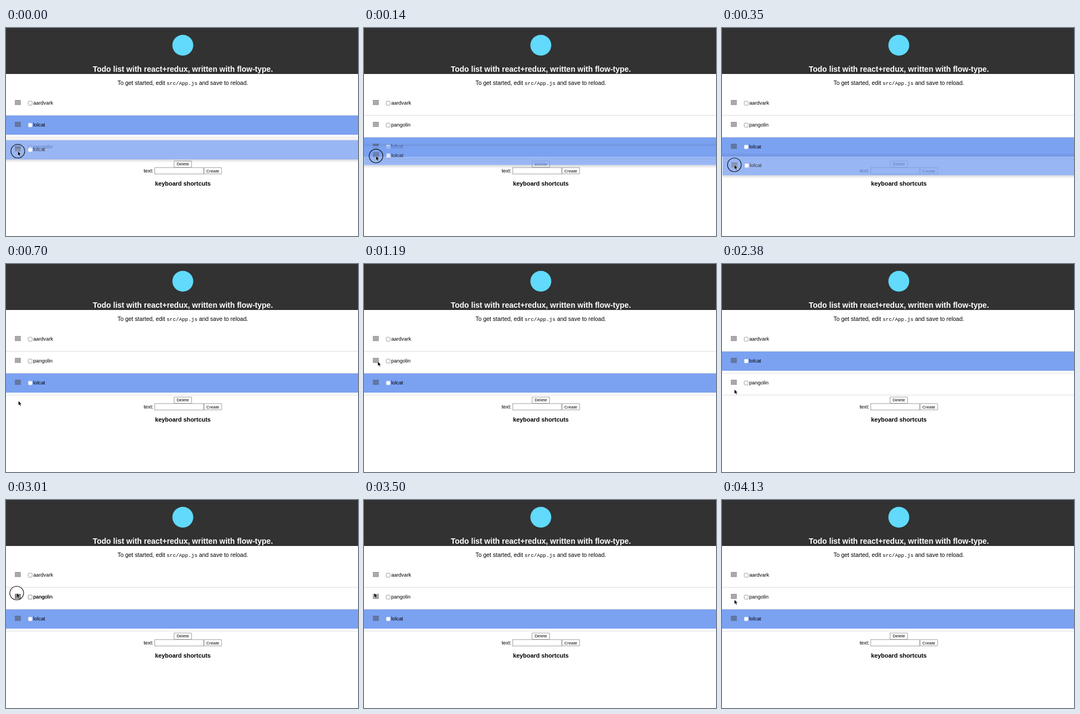
An HTML page that plays this animation: 640 px wide and 380 px high, repeating every 4.2 s.

```html
<!DOCTYPE html>
<html lang="en">
<head>
<meta charset="utf-8">
<title>Todo list</title>
<style>
  html, body { margin: 0; width: 100%; height: 100%; overflow: hidden; background: #fff; }
  svg { display: block; width: 100%; height: 100%; }
  text { font: 9.33px "Liberation Sans", Arial, sans-serif; fill: #000; white-space: pre; }
  .title { font-size: 14px; font-weight: bold; fill: #fff; text-anchor: middle; }
  .intro { font-size: 10.5px; }
  .code { font: 9.33px "Liberation Mono", "Courier New", monospace; }
  .heading { font-size: 10.92px; font-weight: bold; text-anchor: middle; }
  .button { font-size: 7.78px; text-anchor: middle; }
  .box { fill: #fff; stroke: #858585; stroke-width: .8; }
  .rule { stroke: #dedede; }
  .grip { fill: none; stroke: #484848; stroke-width: .9; }
</style>
</head>
<body>
<svg viewBox="0 0 640 380">
  <defs>
    <linearGradient id="below" x2="0" y2="1">
      <stop stop-color="#000" stop-opacity=".2"/>
      <stop offset="1" stop-color="#000" stop-opacity="0"/>
    </linearGradient>
    <linearGradient id="above" x2="0" y2="1">
      <stop stop-color="#000" stop-opacity="0"/>
      <stop offset="1" stop-color="#000" stop-opacity=".11"/>
    </linearGradient>
  </defs>
  <rect width="640" height="380" fill="#fff"/>
  <rect width="640" height="84" fill="#323232"/>
  <circle cx="321.5" cy="31.5" r="19" fill="#61dafb"/>
  <text class="title" x="321.5" y="79.5">Todo list with react+redux, written with flow-type.</text>
  <text class="intro" x="202.7" y="104.3">To get started, edit <tspan class="code">src/App.js</tspan> and save to reload.</text>

  <path class="rule" d="M0 159.5H640M0 199.5H640M0 239.5H640"/>
  <g id="rows"></g>

  <rect class="box" x="305.5" y="243" width="32" height="11.5" rx=".6"/>
  <text class="button" x="321.5" y="251.4">Delete</text>
  <text x="250.2" y="263.8">text:</text>
  <rect class="box" x="270.5" y="255" width="89" height="11.8"/>
  <rect class="box" x="360" y="255" width="32" height="11.5" rx=".6"/>
  <text class="button" x="376" y="263.5">Create</text>
  <text class="heading" x="321.5" y="287.8">keyboard shortcuts</text>

  <g id="ghosts" opacity=".77"></g>
  <g id="pointer">
    <circle id="ring" r="12.5" fill="none" stroke="#111" stroke-width="1.2"/>
    <path d="M0 0V8.2L1.9 6.5L3.2 9.4L4.7 8.7L3.4 5.9H5.9Z" fill="#000" stroke="#fff" stroke-width=".5"/>
  </g>
</svg>
<script>
const LOOP = 4200, STEP = 70, BLUE = "#7ba1f1";
const $ = id => document.getElementById(id);

// time, x, y of the pointer
const path = [
  [0, 21.5, 225], [350, 22.5, 250], [700, 22.5, 250],
  [1120, 25, 178], [1330, 25, 178], [1750, 24.5, 238],
  [1960, 23.5, 242], [2240, 23, 240], [2380, 22.5, 229],
  [2590, 22, 210], [2730, 21.5, 207], [3010, 19.5, 170],
  [3220, 18.5, 169], [3500, 18.5, 170], [3780, 22, 207],
  [3920, 22.5, 207], [4130, 22.5, 182], [LOOP, 22, 182]
];

const drags = [
  { name: "lolcat", from: 0, to: 630, offset: t => -3 + 4 * Math.min(1, t / 350), left: 21.5 },
  { name: "pangolin", from: 1330, to: 2310, offset: () => -1 },
  { name: "pangolin", from: 2590, to: 3500, offset: () => 7 }
];

// lolcat sits above pangolin during these spans
const lolcatFirst = t => t < 70 || (t >= 1610 && t < 2940);

function rowMarkup(name, shadow) {
  const blue = name === "lolcat";
  const back = blue ? `<rect y="-17" width="640" height="35" fill="${BLUE}"/>` : "";
  const shade = blue && shadow
    ? `<rect y="-23" width="640" height="6" fill="url(#above)"/>
       <rect y="18" width="640" height="6" fill="url(#below)"/>` : "";
  const bars = [0, 1, 2, 3, 4].map(i => `M16 ${-4.7 + i * 1.9}h11`).join("");
  return `${shade}${back}<path class="grip" d="${bars}"/>
    <rect class="box" x="40.4" y="-3.2" width="7.2" height="7.2" rx="1.4"
      ${blue ? 'style="stroke:#b9c4dd"' : ""}/>
    <text x="49.4" y="3.2">${name}</text>`;
}

function addRow(parent, name, shadow) {
  const row = document.createElementNS("http://www.w3.org/2000/svg", "g");
  row.innerHTML = rowMarkup(name, shadow);
  parent.append(row);
  return row;
}

const place = (node, x, y) => node.setAttribute("transform", `translate(${x} ${y})`);
const show = (node, on) => node.setAttribute("visibility", on ? "visible" : "hidden");

const rows = {}, ghosts = {};
for (const name of ["aardvark", "lolcat", "pangolin"]) rows[name] = addRow($("rows"), name);
for (const name of ["lolcat", "pangolin"]) ghosts[name] = addRow($("ghosts"), name, true);
place(rows.aardvark, 0, 137);

function pointerAt(t) {
  const i = path.findIndex(p => p[0] > t);
  const [t0, x0, y0] = path[i - 1], [t1, x1, y1] = path[i];
  const u = (t - t0) / (t1 - t0), e = u * u * (3 - 2 * u);
  return [x0 + (x1 - x0) * e, y0 + (y1 - y0) * e];
}

function draw(time) {
  const t = Math.floor((time % LOOP) / STEP + 1e-6) * STEP % LOOP;
  const [x, y] = pointerAt(t);
  const drag = drags.find(d => t >= d.from && t < d.to);
  const first = lolcatFirst(t);

  place(rows.lolcat, 0, first ? 177 : 217);
  place(rows.pangolin, 0, first ? 217 : 177);
  for (const name in ghosts) show(ghosts[name], drag && drag.name === name);
  if (drag) place(ghosts[drag.name], drag.left ? x - drag.left : 0, y + drag.offset(t));
  place($("pointer"), x, y);
  show($("ring"), drag);
}

const start = performance.now();
function tick() {
  draw(performance.now() - start);
  requestAnimationFrame(tick);
}
tick();
</script>
</body>
</html>
```
